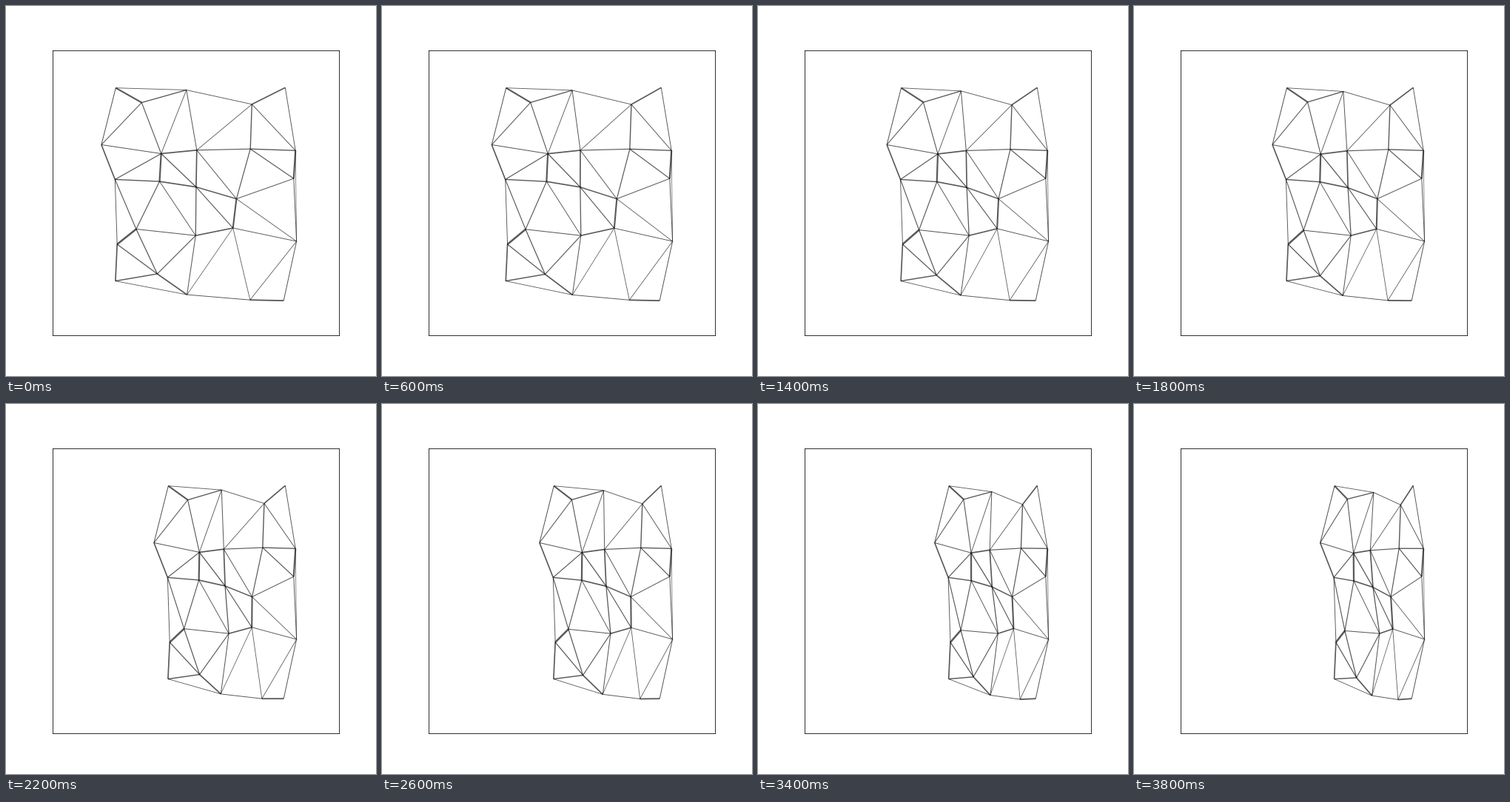
These frames come from a looping animation (500 px wide and 500 px high, 4 s). A matplotlib script:

```python
import numpy as np
import matplotlib.pyplot as plt
from matplotlib.animation import FuncAnimation
from matplotlib.collections import LineCollection
from matplotlib.tri import Triangulation

FRAMES = 20
PULL = 122.7        # total travel of the left side, in pixels
MAX_LEN = 128       # longer links along the hull are left out
SQUASH = 0.75       # vertical scale used when linking the nodes

pulled = [(148.3, 110.7), (128.9, 187.5), (147.3, 234.4),
          (150.2, 322), (147.9, 371.6)]
fixed = [(377.3, 110.3), (391.2, 195.3), (388.8, 233.2),
         (392.6, 318), (375.2, 398.2)]
# free nodes and how far each has drifted by the last frame
free = [(183.3, 130.5), (243.8, 113.5), (332.3, 132.8),
        (209.7, 199.5), (257.8, 194.8), (330.2, 193.2),
        (207.5, 237.1), (256.9, 244.6), (311.4, 260.6),
        (175.9, 301.5), (256.3, 310.2), (306.7, 300),
        (204.4, 362), (244.6, 390.1), (329.8, 397.2)]
drift = [(105, -2), (80, 6), (28, 3.5),
         (87, 2), (61.5, 3), (28, 2),
         (89.5, 2), (66, 3), (35.7, 0),
         (109, 5), (75.5, 0), (43, 4),
         (96.3, 8), (77, 4), (27, 2.3)]

rest = np.array(pulled + free + fixed)
shift = np.array([(PULL, 0)] * len(pulled) + drift + [(0, 0)] * len(fixed))

links = Triangulation(rest[:, 0], rest[:, 1] * SQUASH).edges
length = np.linalg.norm(rest[links[:, 0]] - rest[links[:, 1]], axis=1)
links, length = links[length < MAX_LEN], length[length < MAX_LEN]
inner = np.arange(len(rest))[len(pulled):]


def nodes(i):
    s = i / (FRAMES - 1)
    ease = np.full(rest.shape, s)
    # free nodes run slightly ahead sideways and sag late
    ease[inner] = s + 0.06 * s * (1 - s), s ** 1.5
    return rest + shift * ease


fig, ax = plt.subplots(figsize=(5, 5), dpi=100)
ax.set(xlim=(62.5, 450), ylim=(445, 60), xticks=[], yticks=[])
ax.spines[:].set_linewidth(0.58)

# stiffer (shorter) links are drawn thicker
net = LineCollection(rest[links], linewidths=60 / length,
                     colors="black", alpha=0.65)
ax.add_collection(net, autolim=False)


def update(i):
    net.set_segments(nodes(i)[links])
    return [net]


anim = FuncAnimation(fig, update, frames=FRAMES, interval=200,
                     repeat=True, repeat_delay=0)
plt.show()
```
